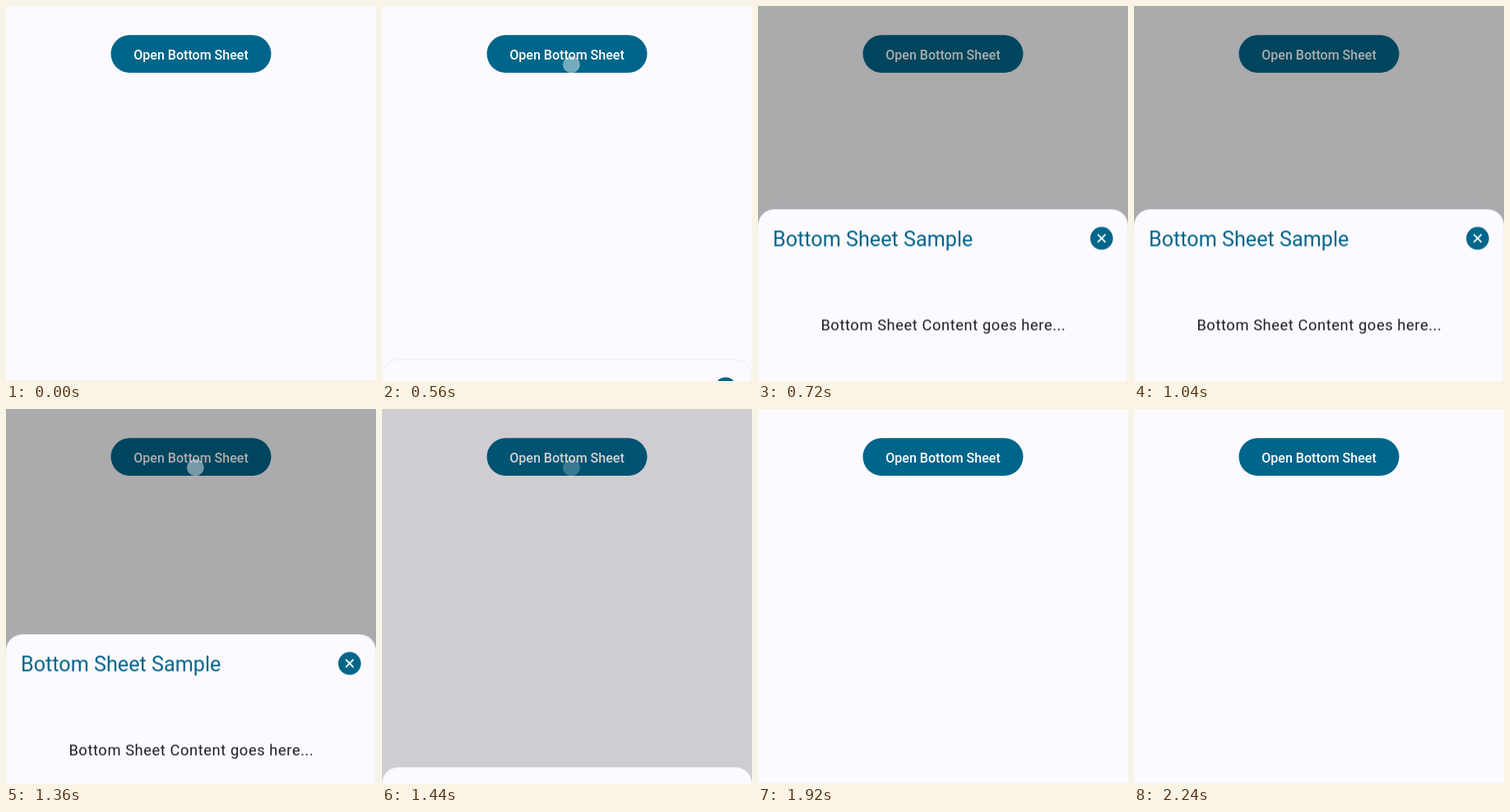
An HTML page that plays this animation: 450x455 px, repeating every 2.32 s.

```html
<!DOCTYPE html>
<html lang="en">
<head>
<meta charset="utf-8">
<title>Bottom sheet</title>
<style>
  html, body { margin: 0; width: 100%; height: 100%; overflow: hidden; background: #fcfaff; }
  svg { display: block; width: 450px; height: 455px; font-family: Roboto, sans-serif; }
  .scrim, .sheet, .touch { animation: 2320ms step-end infinite; }
  .scrim { animation-name: dim; }
  .sheet { animation-name: slide; }
  .touch { animation-name: tap; }

  /* One step every 80 ms, 3.448% of the loop */
  @keyframes slide {
    0%      { transform: translateY(470px); }
    24.13%  { transform: translateY(429px); }
    27.58%  { transform: translateY(288px); }
    31.03%  { transform: translateY(246.5px); }
    58.62%  { transform: translateY(273.3px); }
    62.06%  { transform: translateY(434.5px); }
    65.51%, 100% { transform: translateY(470px); }
  }
  @keyframes dim {
    0%      { opacity: 0; }
    27.58%  { opacity: .16; }
    31.03%  { opacity: .32; }
    62.06%  { opacity: .18; }
    65.51%  { opacity: .02; }
    68.96%, 100% { opacity: 0; }
  }
  @keyframes tap {
    0%      { opacity: 0; }
    20.68%  { opacity: 1; }
    27.58%  { opacity: .5; }
    31.03%  { opacity: 0; }
    55.17%  { opacity: 1; }
    62.06%  { opacity: .5; }
    65.51%, 100% { opacity: 0; }
  }
</style>
</head>
<body>
<svg viewBox="0 0 450 455">
  <rect width="450" height="455" fill="#fcfaff"/>
  <rect y="454" width="450" height="1" fill="#f5f3f7"/>

  <rect x="127.5" y="35.2" width="195" height="45.8" rx="22.9" fill="#00658a"/>
  <text x="225" y="64.5" text-anchor="middle" font-size="16.04" font-weight="500" fill="#fff">Open Bottom Sheet</text>

  <rect class="scrim" width="450" height="455"/>

  <g class="sheet">
    <path d="M0 230V20a20 20 0 0 1 20-20H430a20 20 0 0 1 20 20V230Z" fill="#fcfaff" stroke="#000" stroke-opacity=".03" stroke-width="2"/>
    <text x="18" y="44.8" font-size="25.2" fill="#00658a">Bottom Sheet Sample</text>
    <circle cx="417.9" cy="35.4" r="13.8" fill="#00658a"/>
    <path d="M413.2 30.7l9.4 9.4m0-9.4l-9.4 9.4" stroke="#fff" stroke-width="1.9"/>
    <text x="225.4" y="147.2" text-anchor="middle" font-size="18.33" letter-spacing=".573" fill="#191c1e">Bottom Sheet Content goes here...</text>
  </g>

  <circle class="touch" cx="230.4" cy="71" r="10" fill="#e8f0f4" fill-opacity=".5" stroke="#fff" stroke-opacity=".25"/>
</svg>
</body>
</html>
```
